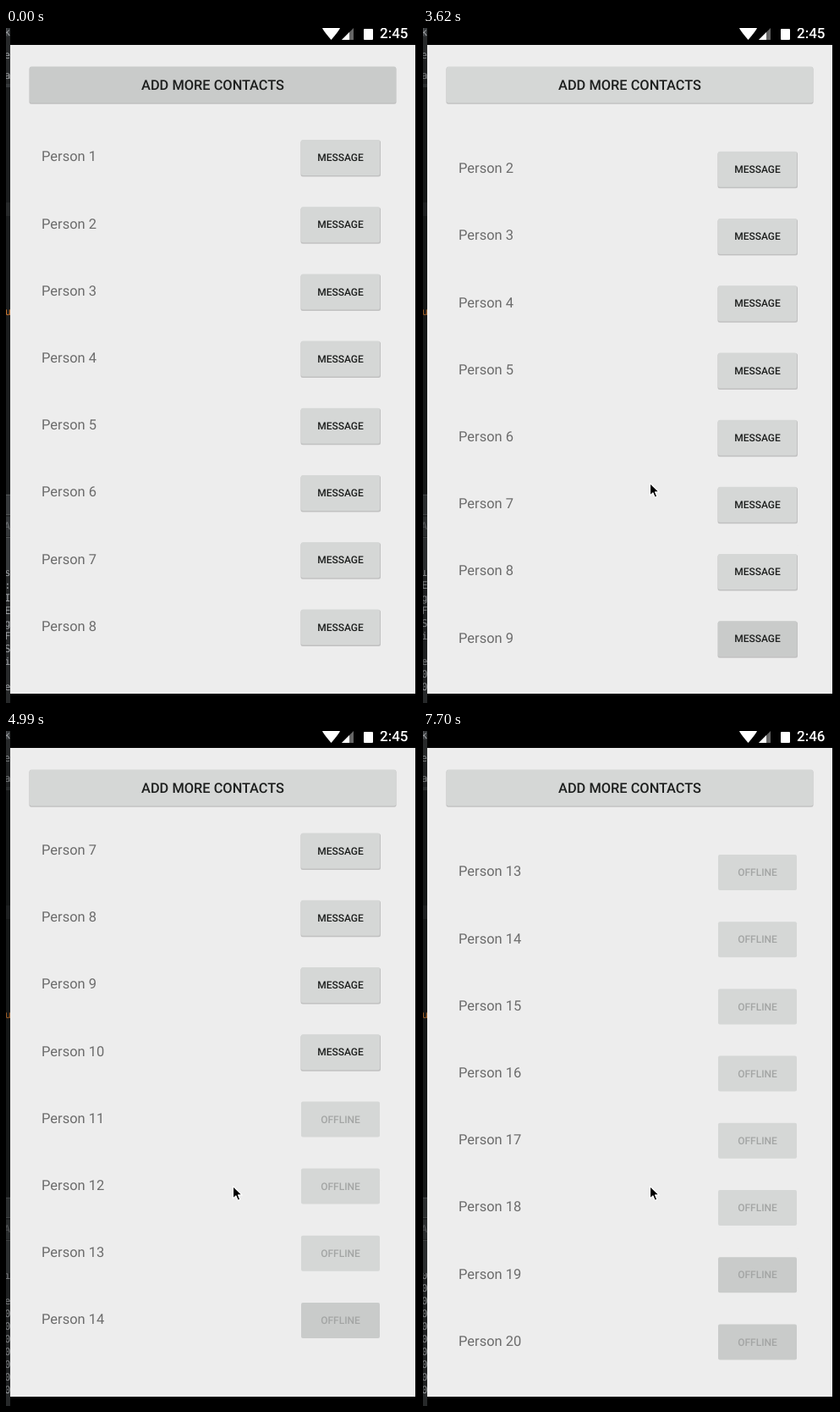
These frames come from a looping animation (486 px wide and 797 px high, 8 s). An HTML page:

```html
<!DOCTYPE html>
<html lang="en">
<head>
<meta charset="utf-8">
<title>Contact list</title>
<style>
  html, body { margin: 0; width: 100%; height: 100%; overflow: hidden; background: #000; }
  svg { display: block; width: 486px; height: 797px; }
  text { font-family: Roboto, sans-serif; text-rendering: geometricPrecision; }
  .name { font-size: 16.5px; fill: #6c6c6c; }
  .label, .title, .clock { font-weight: 500; }
  .label { font-size: 12px; text-anchor: middle; fill: #1d1f1e; }
  .title { font-size: 16.4px; text-anchor: middle; fill: #1d1f1e; }
  .clock { font-size: 17px; fill: #fff; }
  .off .label { fill: #a3a5a4; }
  .off .shadow { display: none; }
  .shadow { fill: #000; }
  .code text { font: 12px "DejaVu Sans Mono", monospace; fill: #a2a5a8; text-anchor: end; }
  .code .key { fill: #cc7832; }
</style>
</head>
<body>
<svg viewBox="0 0 486 797">
  <defs>
    <clipPath id="edge"><path d="M0 0H5V797H0Z"/></clipPath>
    <clipPath id="logBox"><path d="M0 640H5V786H0Z"/></clipPath>
    <clipPath id="listBox"><path d="M5 113H484V749H5Z"/></clipPath>
  </defs>
  <rect width="486" height="797"/>
  <g class="code" clip-path="url(#edge)">
    <rect width="5" height="797" fill="#27292a"/>
    <path fill="#36393b" d="M0 0H5V10H0ZM0 66H5V70H0ZM0 551H5V574H0ZM0 577H5V600H0ZM0 602H5V640H0Z"/>
    <path fill="#1b1d1e" d="M0 70H5V206H0ZM0 222H5V550H0Z"/>
    <path fill="#515456" d="M0 551H5V552H0ZM0 574H5V575H0ZM0 601H5V602H0Z"/>
    <text x="5" y="9">k</text>
    <text x="5" y="36">e</text>
    <text x="5.5" y="60">a</text>
    <text x="6" y="339" class="key">u</text>
    <text x="5" y="592" opacity=".5">A</text>
    <g clip-path="url(#logBox)"><g id="log"></g></g>
    <rect id="dim" width="5" height="751" y="30" opacity="0"/>
  </g>

  <rect x="5" y="20" width="479" height="766" fill="#ededed"/>
  <path d="M374 0H395Q394 3 384.500 14Q375 3 374 0Z" fill="#fff"/>
  <path d="M397 14L411 0V14Z" fill="#666"/>
  <path d="M397 14L406 5V14Z" fill="#fff"/>
  <rect x="423" y="1" width="11" height="13" rx="1" fill="#fff"/>
  <text id="clock" class="clock" x="442" y="12">2:45</text>

  <rect class="shadow" x="27.500" y="46" width="434" height="43.800" rx="2.500" opacity=".2"/>
  <rect id="add" x="28" y="45.500" width="433" height="43" rx="2"/>
  <text class="title" x="244.500" y="73.200">ADD MORE CONTACTS</text>

  <g clip-path="url(#listBox)"><g id="list"></g></g>
  <path id="cursor" d="M0 0V14.500L3.400 11.300L5.700 16.800L8.300 15.700L6 10.400H10.600Z"
        stroke="#fff" stroke-width="1.100" stroke-linejoin="round"/>
</svg>
<script>
const LOOP = 8000, PITCH = 79.2, ROWS = 22;
const LIGHT = 213, DARK = 201;
const $ = id => document.getElementById(id);
const clamp = (v, lo = 0, hi = 1) => Math.min(hi, Math.max(lo, v));
const smooth = u => u * u * (3 - 2 * u);
const gray = v => `rgb(${v},${v + 2},${v + 1})`;

// Each swipe advances in evenly spaced steps; bend skews its easing.
const swipes = [
  { start: 3140, end: 4100, steps: 7, from: 0, to: 193, bend: 1.68 },
  { start: 4250, end: 5290, steps: 8, from: 193, to: 541, bend: 1 },
  { start: 5470, end: 6500, steps: 8, from: 541, to: 936.4, bend: 0.7 }
];

// Share of the steps already taken, counting the one at the start time.
function stepped(t, start, end, steps) {
  const gap = (end - start) / (steps - 1);
  return clamp(Math.floor((t - start + 6) / gap) + 1, 0, steps) / steps;
}

function scrollAt(t) {
  return swipes.reduce((sum, s) => {
    const u = stepped(t, s.start, s.end, s.steps);
    return sum + (s.to - s.from) * smooth(u ** s.bend);
  }, 0);
}

function rowMarkup(n) {
  const off = n > 10;
  return `<g class="${off ? 'off' : ''}" transform="translate(0 ${(n - 1) * PITCH})">
    <text class="name" x="42" y="157.400">Person ${n}</text>
    <rect class="shadow" x="348.500" y="132.500" width="94.500" height="43" rx="2.500" opacity=".19"/>
    <rect class="face" x="349" y="132" width="93" height="42" rx="2"/>
    <text class="label" x="395.500" y="157.200">${off ? 'OFFLINE' : 'MESSAGE'}</text>
  </g>`;
}

$('list').innerHTML = Array.from({ length: ROWS }, (_, i) => rowMarkup(i + 1)).join('');
const faces = [...document.querySelectorAll('.face')];

const logLines = [...'s:IEgFSi e', ...'0'.repeat(12)];
$('log').innerHTML = logLines.map((c, i) =>
  `<text x="5.500" y="${647 + i * 15}">${c}</text>`).join('');

function draw(t) {
  const scroll = scrollAt(t);
  $('list').setAttribute('transform', `translate(0 ${-scroll})`);
  faces.forEach((face, i) => {
    const y = 152 + i * PITCH - scroll;
    const fresh = i > 7 && (y > 650 || i > 17);
    face.setAttribute('fill', gray(fresh ? DARK : LIGHT));
  });

  // Every newly bound row prints one log line.
  const printed = scroll > 0 ? Math.floor(scroll / PITCH + 1.2) : 0;
  $('log').setAttribute('transform', `translate(0 ${-15 * Math.min(printed, 12)})`);
  $('dim').setAttribute('opacity', t >= 2240 ? 0.22 : 0);

  const fade = clamp((t - 2300) / 1200);
  $('add').setAttribute('fill', gray(Math.round(DARK + (LIGHT - DARK) * fade)));
  $('clock').textContent = t < 6050 ? '2:45' : '2:46';

  const move = smooth(clamp((stepped(t, 440, 890, 4) - 0.25) / 0.75));
  $('cursor').setAttribute('transform',
    `translate(${440 - 171.5 * move} ${617 - 79.5 * move})`);
  $('cursor').setAttribute('visibility', t >= 440 ? 'visible' : 'hidden');
}

const began = performance.now();
function tick() {
  draw((performance.now() - began) % LOOP);
  requestAnimationFrame(tick);
}
tick();
</script>
</body>
</html>
```
